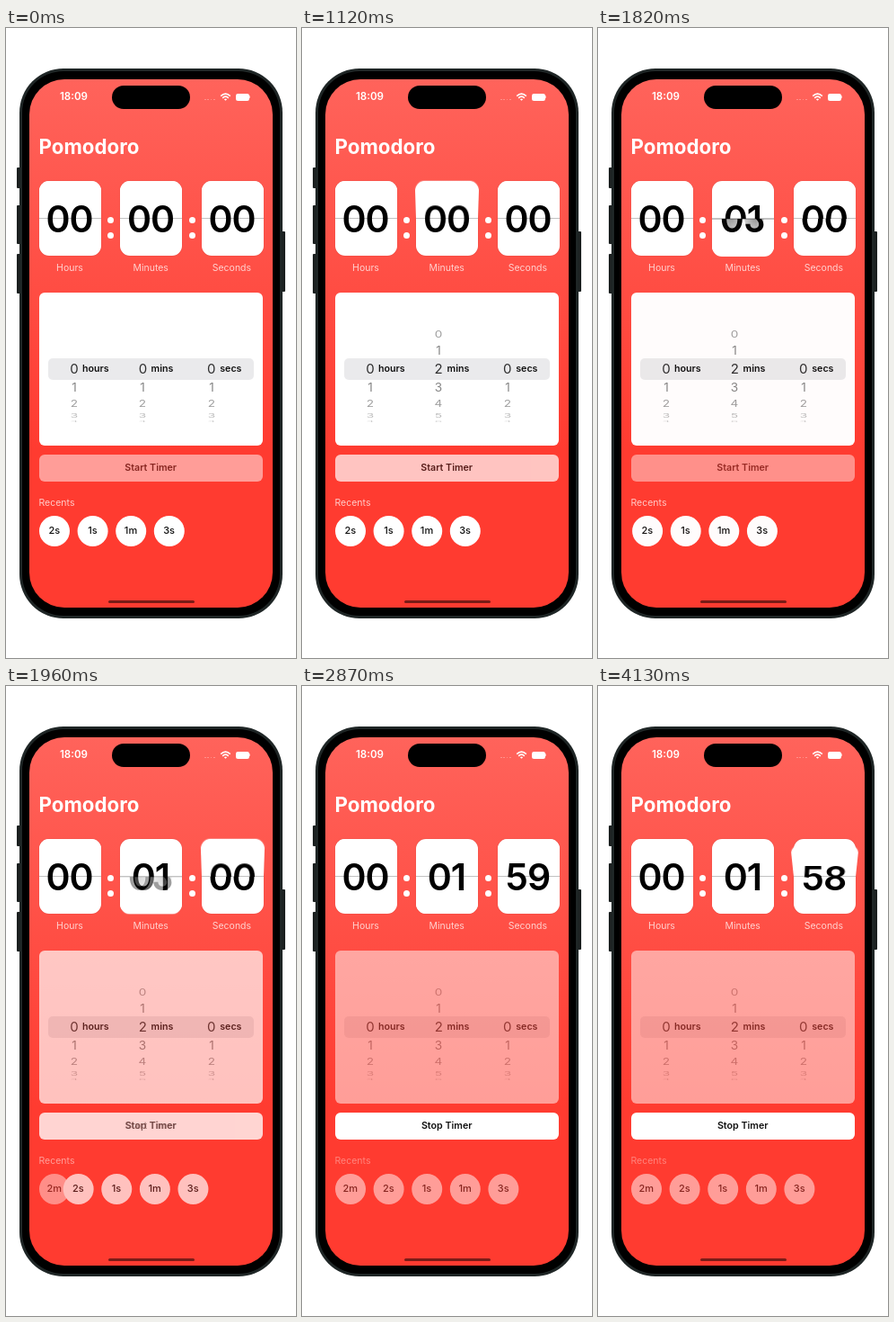
These frames come from a looping animation (323x700 px, 4200 ms). An HTML page:

```html
<!DOCTYPE html>
<html lang="en">
<head>
<meta charset="utf-8">
<title>Pomodoro</title>
<style>
html, body { margin: 0; width: 100%; height: 100%; overflow: hidden; background: #fff; }
#stage { position: absolute; left: 0; top: 0; width: 323px; height: 700px; overflow: hidden; font-family: Inter, Roboto, sans-serif; }
#stage div, #stage svg { position: absolute; }
.text { white-space: pre; line-height: 1.2; transform: translate(-50%, -50%); }
.left { transform: translate(0, -50%); }
.half { left: 0; width: 69px; overflow: hidden; background: #fff; color: #000; font-size: 41px; font-weight: 600; letter-spacing: -1px; }
.half div { left: -.5px; width: 69px; line-height: 84px; text-align: center; }
.upper { top: 0; height: 42px; border-radius: 11px 11px 0 0; transform-origin: 50% 100%; }
.upper div { top: 0; }
.upper::after { content: ''; position: absolute; left: 0; bottom: 0; width: 100%; height: 1px; background: rgba(0,0,0,.24); }
.lower { top: 42px; height: 41px; border-radius: 0 0 11px 11px; transform-origin: 50% 0; }
.lower div { top: -42px; }
.ghost {
  --lobe: rgba(0,0,0,.4), rgba(0,0,0,.2) 92%, transparent;
  background: radial-gradient(11px 15px at 22px 100%, var(--lobe)), radial-gradient(11px 15px at 47px 100%, var(--lobe)), #fff;
  transform: scaleY(-1);
}
</style>
</head>
<body>
<div id="stage"></div>
<script>
const stage = document.getElementById('stage');
const LOOP = 4200, STEP = 70, FLIP = 800, SET = 965, TAP = 1785;

function add(parent, cls = '', text = '') {
  const el = document.createElement('div');
  el.className = cls;
  el.textContent = text;
  parent.append(el);
  return el;
}
function box(parent, x, y, w, h, fill, radius = 0) {
  const el = add(parent);
  el.style.cssText = `left:${x}px;top:${y}px;width:${w}px;height:${h}px;background:${fill};border-radius:${radius}px`;
  return el;
}
function label(parent, text, x, y, size, weight, color, cls = '') {
  const el = add(parent, 'text ' + cls, text);
  el.style.cssText = `left:${x}px;top:${y}px;font-size:${size}px;font-weight:${weight};color:${color}`;
  return el;
}

// Phone body, side buttons and screen
for (const [x, y, h] of [[12, 155, 23], [12, 197, 43], [12, 251, 44], [306, 226, 67]]) box(stage, x, y, 5, h, '#1b2020', 1);
box(stage, 15, 45, 293, 610.5, '#1f2626', 49);
box(stage, 18, 48, 287, 604.5, '#000', 46);
box(stage, 26, 57, 271, 587, 'linear-gradient(#ff635b, #ff4a40 45%, #ff3b30 70%)', 39);
box(stage, 118, 64, 86.5, 26, '#000', 13);
box(stage, 114, 635.5, 96, 3.2, 'rgba(0,0,0,.52)', 2);

// Status bar
label(stage, '18:09', 75.5, 77, 11.6, 600, '#fff');
for (let i = 0; i < 4; i++) box(stage, 221 + i * 3.3, 78.5, 1.8, 1.8, 'rgba(255,255,255,.35)', 1);
stage.insertAdjacentHTML('beforeend', `<svg style="left:238px;top:71px" width="13" height="11" fill="none" stroke="#fff" stroke-width="1.7">
<path d="M1.2 4.6Q6.5 -.4 11.8 4.6M3.2 6.8Q6.5 3.6 9.8 6.8"/><path d="M4.9 8.2Q6.5 7 8.1 8.2L6.5 9.8Z" fill="#fff" stroke="none"/></svg>`);
box(stage, 256, 73, 14.5, 7.5, '#fff', 2.3);
box(stage, 271.2, 75.4, 1.2, 2.8, 'rgba(255,255,255,.6)', 1);

// Title and clock
label(stage, 'Pomodoro', 36.5, 132, 22.3, 700, '#fff', 'left');
['Hours', 'Minutes', 'Seconds'].forEach((name, i) =>
  label(stage, name, 71 + i * 90.2, 267, 10.5, 400, 'rgba(255,255,255,.74)'));
for (const x of [116, 207]) for (const y of [213, 230]) box(stage, x - 3.5, y - 3.5, 7, 7, '#fff', 4);

function makeCard(x) {
  const el = box(stage, x, 170, 69, 83, 'none', 11);
  el.style.boxShadow = '0 0 1px rgba(0,0,0,.3)';
  const parts = ['upper', 'lower', 'upper', 'lower', 'upper ghost'].map(cls => {
    const part = add(el, 'half ' + cls);
    add(part);
    return part;
  });
  const [top, bottom, topFlap, bottomFlap, ghost] = parts;
  ghost.style.opacity = 0;
  return { top, bottom, topFlap, bottomFlap, ghost };
}
const cards = [36.5, 127, 217.5].map(makeCard);
const write = (el, text) => { el.firstChild.textContent = text; };

function drawCard(card, from, to, start, t) {
  const angle = 180 * ease((t - start) / FLIP);
  const first = angle < 90;
  write(card.top, to);
  write(card.bottom, angle < 180 ? from : to);
  write(card.topFlap, from);
  write(card.bottomFlap, to);
  card.topFlap.style.visibility = first ? 'visible' : 'hidden';
  card.bottomFlap.style.visibility = first ? 'hidden' : 'visible';
  card.topFlap.style.transform = angle > 0 ? `perspective(270px) rotateX(${-angle}deg)` : 'none';
  card.bottomFlap.style.transform = angle < 180 ? `perspective(270px) rotateX(${180 - angle}deg)` : 'none';
}

// Picker wheels
const panel = box(stage, 36.5, 294, 249.5, 170, '#fff', 6);
box(panel, 10.5, 73, 229, 24, 'rgba(110,110,122,.14)', 5);
const wheels = ['hours', 'mins', 'secs'].map((unit, i) => {
  label(panel, unit, 48.5 + i * 76.6, 85, 10.7, 600, '#111', 'left');
  return Array.from({ length: 8 }, (_, n) => label(panel, n, 39.5 + i * 76.4, 85, 14, 400, '#000'));
});
function drawWheel(items, pos) {
  items.forEach((el, n) => {
    const d = n - pos, a = d * 20.5 * Math.PI / 180, far = Math.abs(d);
    const near = far < .5;
    el.style.visibility = far > 4.3 ? 'hidden' : 'visible';
    el.style.opacity = near ? .8 : Math.max(.12, .58 - .1 * far);
    el.style.fontSize = near ? '15px' : '13.6px';
    el.style.transform = `translate(-50%, -50%) translateY(${58.5 * Math.sin(a)}px) scaleY(${Math.cos(a)})`;
  });
}

// Button and recents
const button = box(stage, 36.5, 474, 249.5, 30, '#fff', 6);
const [startText, stopText] = ['Start Timer', 'Stop Timer'].map(s => label(button, s, 124.7, 15.3, 10.7, 600, '#111'));
const recents = box(stage, 0, 0, 323, 700, 'none');
label(recents, 'Recents', 36.5, 528, 10.5, 400, 'rgba(255,255,255,.74)', 'left');
const chips = ['2m', '2s', '1s', '1m', '3s'].map(name => {
  const el = box(recents, 36.5, 541.8, 34.6, 34.6, '#fff', 18);
  label(el, name, 17.3, 17.3, 11, 500, '#111');
  return el;
});

// Standard ease-in-out, cubic-bezier(.42, 0, .58, 1)
function ease(x) {
  if (x <= 0) return 0;
  if (x >= 1) return 1;
  let lo = 0, hi = 1, u;
  for (let i = 0; i < 20; i++) {
    u = (lo + hi) / 2;
    const v = 1 - u;
    if (1.26 * u * v * v + 1.74 * u * u * v + u * u * u < x) lo = u; else hi = u;
  }
  return u * u * (3 - 2 * u);
}

function draw(t) {
  const run = ease((t - TAP) / 305);

  drawCard(cards[0], '00', '00', LOOP, t);
  if (t < TAP) drawCard(cards[1], '00', t < SET ? '00' : '02', SET, t);
  else drawCard(cards[1], '01', '01', 0, t);
  // The folded flap, seen from behind, fades out when the timer starts
  write(cards[1].ghost, '02');
  cards[1].ghost.style.opacity = t < TAP ? 0 : 1 - run;

  if (t < 2870) drawCard(cards[2], '00', t < 1800 ? '00' : '59', 1800, t);
  else if (t < 3870) drawCard(cards[2], '59', '58', 2870, t);
  else drawCard(cards[2], '58', '57', 3870, t);

  drawWheel(wheels[0], 0);
  drawWheel(wheels[1], 2 * ease((t - 40) / 860));
  drawWheel(wheels[2], 0);

  panel.style.opacity = recents.style.opacity = 1 - .5 * run;
  button.style.opacity = t < 1750 ? .5 + .5 * ease((t - SET) / 350) : .42 + .58 * run;
  startText.style.opacity = 1 - run;
  stopText.style.opacity = run;
  chips.forEach((el, i) => {
    el.style.transform = `translateX(${i ? 42.6 * (i - 1 + run) : 0}px)`;
  });
  chips[0].style.opacity = run;
}

const begin = performance.now();
function tick() {
  const t = (performance.now() - begin) % LOOP;
  draw(Math.floor(t / STEP) * STEP);
  requestAnimationFrame(tick);
}
tick();
</script>
</body>
</html>
```
